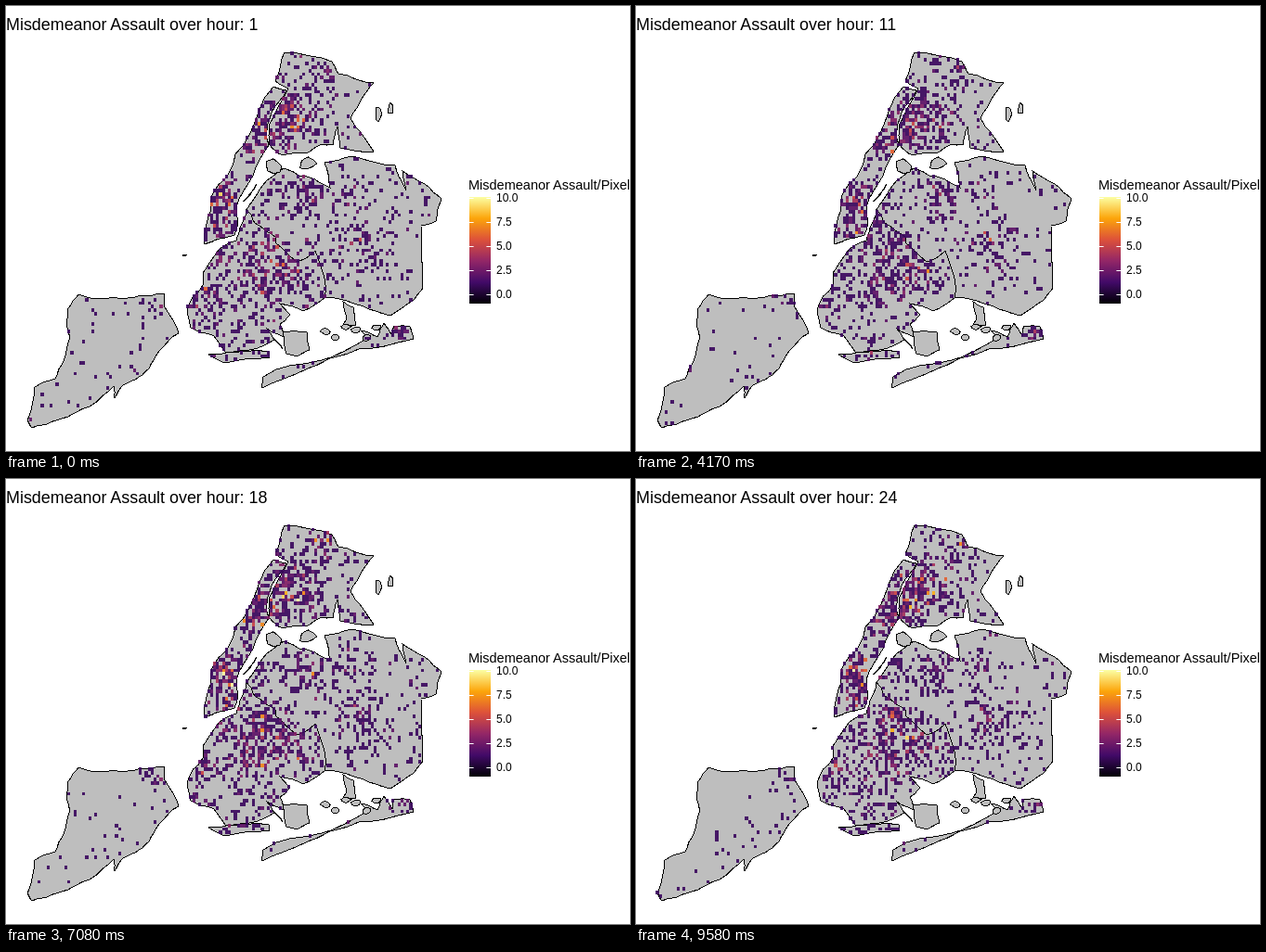
These frames come from a looping animation (672 px wide and 480 px high, 10 s). An HTML page with a canvas:

```html
<!DOCTYPE html>
<html lang="en">
<head>
<meta charset="utf-8">
<title>Misdemeanor Assault by hour</title>
<style>
  html, body { margin: 0; width: 100%; height: 100%; overflow: hidden; background: #fff; }
  svg, canvas { position: absolute; left: 0; top: 0; width: 672px; height: 480px; display: block; }
  text { font-family: "Liberation Sans", Arial, sans-serif; fill: #000; }
  polygon { fill: #bebebe; stroke: #000; stroke-width: 1; shape-rendering: crispEdges; }
</style>
</head>
<body>
<svg viewBox="0 0 672 480">
  <defs><linearGradient id="ramp" x1="0" y1="1" x2="0" y2="0"></linearGradient></defs>
  <g id="map"></g>
  <text id="title" x="0" y="26" font-size="17.9"></text>
  <text x="498" y="197.5" font-size="14.5">Misdemeanor Assault/Pixel</text>
  <g id="legend" font-size="12"></g>
</svg>
<canvas id="cells" width="672" height="480"></canvas>
<script>
const LOOP = 10000, HOURS = 24;
const CELL_W = 3.2025, CELL_H = 3.8, LEFT = 21.8, BOTTOM = 452;
const inferno = ['#000004', '#420a68', '#932667', '#dd513a', '#fca50a', '#fcffa4'];
const byId = id => document.getElementById(id);
const ctx = byId('cells').getContext('2d');
const areas = [];

function random(a, b, c) {
  let n = Math.imul(a + 11, 374761393) ^ Math.imul(b + 29, 668265263) ^ Math.imul(c + 5, 1274126177);
  n = Math.imul(n ^ n >>> 15, 2246822519);
  n = Math.imul(n ^ n >>> 13, 3266489917);
  return ((n ^ n >>> 16) >>> 0) / 4294967296;
}

// Halves each side, nudging the midpoint; shared borders get the same nudges.
function roughen(points) {
  return points.flatMap(([x, y], i) => {
    const [nx, ny] = points[(i + 1) % points.length];
    const mx = (x + nx) / 2, my = (y + ny) / 2, reach = Math.hypot(nx - x, ny - y) * .12;
    return [[x, y], [mx + (random(mx, my, 1) - .5) * reach, my + (random(mx, my, 2) - .5) * reach]];
  });
}

function addArea(points, density = 0) {
  const outline = points.map(p => p.map(v => v.toFixed(1)).join()).join(' ');
  byId('map').innerHTML += `<polygon points="${outline}"/>`;
  areas.push({ path: new Path2D(`M${outline}Z`), density });
}

function land(keyPoints, density) {
  const points = keyPoints.split(' ').map(p => p.split(',').map(Number));
  addArea(roughen(roughen(points)), density);
}

function islet(x, y, rx, ry) {
  addArea(Array.from({ length: 8 }, (_, i) => {
    const angle = i * Math.PI / 4, r = .7 + .5 * random(x, y, i);
    return [x + rx * r * Math.cos(angle), y + ry * r * Math.sin(angle)];
  }));
}

function buildMap() {
  const border = ' 344,314 344,301 333,264 313,276 290,255 291,250 268,234 259,219';
  land('23,447 31,411 53,402 62,383 69,357 65,344 67,326 78,311 104,316 146,312 170,310 171,325 186,353 165,372 154,391 139,403 126,409 117,423 116,410 90,432 57,446 28,455', .035);
  land('214,257 216,235 222,204 238,184 262,139 288,87 302,91 286,115 280,138 283,150 266,183 248,216 250,235 246,247 230,251', .2);
  land('300,50 351,60 358,73 396,83 383,100 371,121 396,157 360,153 357,130 352,150 338,150 325,158 298,161 284,150 284,127 304,89 290,81', .13);
  land('267,208 281,188 299,175 333,187 349,196 343,169 374,162 419,172 431,199 427,178 451,192 469,208 463,232 447,237 449,304 438,318 414,334 385,324' + border, .08);
  land('252,239 248,253 229,263 212,288 212,301 195,327 199,347 224,356 236,373 262,371 289,360 298,370 280,347 299,357 295,343 306,333 295,321 320,329' + border, .24);
  land('218,376 240,373 283,373 284,379 236,385', .4);
  land('298,351 324,352 327,371 314,378 302,375');
  land('276,412 277,400 340,382 390,358 382,350 400,357 407,342 416,356 418,345 435,346 439,359 380,370 325,391', .08);
  land('255,211 270,192 263,204');
  land('363,319 374,325 377,344 362,347 367,336');
  islet(288, 173, 9, 7);
  islet(325, 170, 10, 6);
  islet(401, 116, 4, 9);
  islet(414, 111, 3, 6);
  islet(192, 269, 2, 1);
  for (let i = 0; i < 6; i++) islet(344 + i * 11, 351 + 7 * Math.sin(i * 2), 5, 3.5);
}

// Hotspots: x, y, spread, strength
const hotspots = [
  [304, 112, 14, 1.3], [293, 137, 12, 1], [328, 130, 13, .6], [345, 73, 11, .5],
  [274, 148, 12, 1.1], [236, 207, 12, 1.7], [235, 238, 10, .8],
  [325, 210, 12, .9], [282, 202, 11, .4], [370, 199, 9, .5], [380, 259, 18, .5],
  [278, 265, 15, .8], [302, 288, 13, .8], [268, 297, 13, .6], [240, 268, 8, .6],
  [218, 312, 9, .6], [163, 320, 9, .35], [428, 352, 8, .7]
];

function buildGrid() {
  const grid = [];
  for (let row = 0; row < 108; row++) for (let col = 0; col < 141; col++) {
    const x = LEFT + (col + .5) * CELL_W, y = BOTTOM - (row + .5) * CELL_H;
    const home = areas.find(a => a.density && ctx.isPointInPath(a.path, x, y));
    if (!home) continue;
    const heat = hotspots.reduce((sum, [cx, cy, spread, strength]) =>
      sum + strength * Math.exp(-((x - cx) ** 2 + (y - cy) ** 2) / (2 * spread ** 2)), home.density);
    const local = .25 - .85 * Math.log(1 - random(col, row, 0));
    grid.push({ col, row, rate: heat * local });
  }
  return grid;
}

// Busy all day except for a dip in the early morning.
function activityAt(hour) {
  const away = Math.abs(hour - 6.5), distance = Math.min(away, HOURS - away);
  return 1.1 - .64 * Math.exp(-((distance / 4.5) ** 2));
}

function poisson(rate, u) {
  let n = 0, p = Math.exp(-rate), sum = p;
  while (u > sum && n < 10) sum += p *= rate / ++n;
  return n;
}

function color(value) {
  const p = Math.min(.999, (value + 1) / 11) * (inferno.length - 1), i = Math.floor(p);
  const channel = (hex, k) => parseInt(hex.slice(k, k + 2), 16);
  const mix = k => Math.round(channel(inferno[i], k) * (1 - p + i) + channel(inferno[i + 1], k) * (p - i));
  return `rgb(${mix(1)},${mix(3)},${mix(5)})`;
}

function drawLegend() {
  byId('ramp').innerHTML = inferno.map((c, i) => `<stop offset="${i / 5}" stop-color="${c}"/>`).join('');
  let html = '<rect x="499" y="206" width="23" height="115" fill="url(#ramp)"/>';
  for (let v = 0; v <= 10; v += 2.5) {
    const y = 311 - v * 10.4;
    html += `<path d="M499,${y + .5}h4.6M517.4,${y + .5}h4.6" stroke="#fff"/>` +
      `<text x="528" y="${y + 4}">${v.toFixed(1)}</text>`;
  }
  byId('legend').innerHTML = html;
}

function drawHour(hour) {
  byId('title').textContent = 'Misdemeanor Assault over hour: ' + hour;
  ctx.clearRect(0, 0, 672, 480);
  ctx.globalAlpha = .92;
  const level = activityAt(hour);
  for (const { col, row, rate } of grid) {
    const n = poisson(rate * level, random(col, row, hour));
    if (!n) continue;
    const x = Math.floor(LEFT + col * CELL_W), right = Math.floor(LEFT + (col + 1) * CELL_W);
    const y = Math.floor(BOTTOM - (row + 1) * CELL_H), bottom = Math.floor(BOTTOM - row * CELL_H);
    ctx.fillStyle = colors[n];
    ctx.fillRect(x, y, right - x, bottom - y);
  }
}

// Hour changes fall on whole hundredths of a second.
function hourAt(time) {
  let hour = 1;
  while (hour < HOURS && time >= Math.round(hour * LOOP / HOURS / 10) * 10) hour++;
  return hour;
}

buildMap();
drawLegend();
const grid = buildGrid();
const colors = Array.from({ length: 11 }, (_, v) => color(v));

let shown = 0;
const start = performance.now();
function tick() {
  const hour = hourAt((performance.now() - start) % LOOP);
  if (hour !== shown) drawHour(shown = hour);
  requestAnimationFrame(tick);
}
tick();
</script>
</body>
</html>
```
